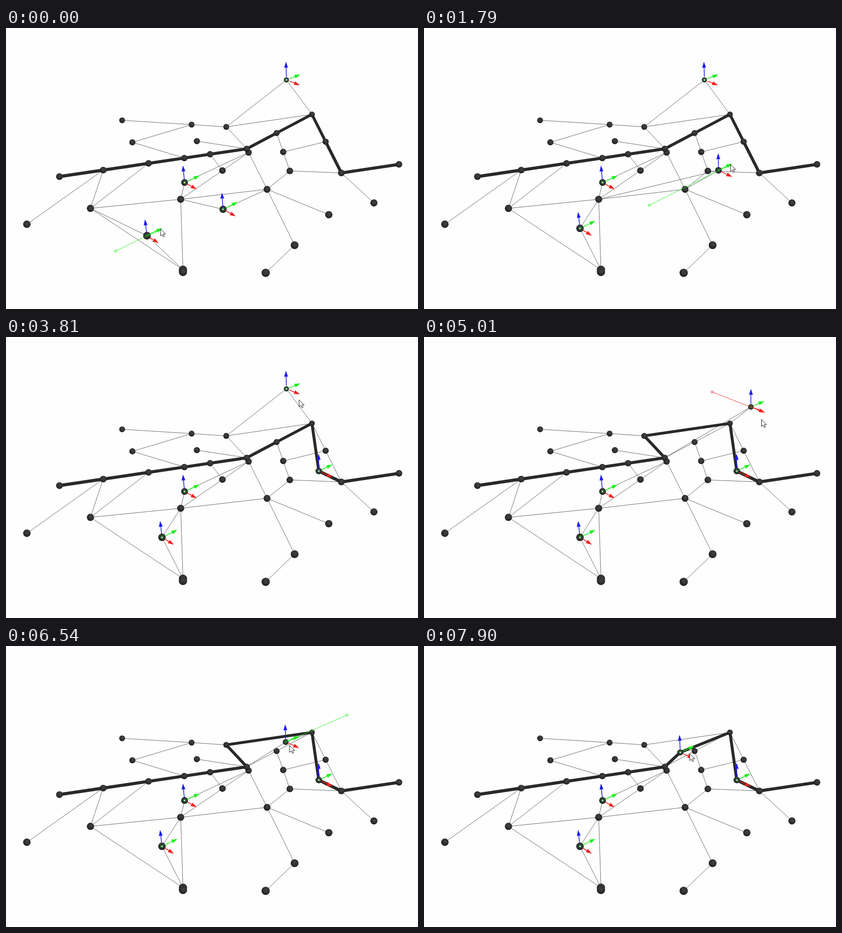
These frames come from a looping animation (904 by 619 pixels, 8 s). An HTML page:

```html
<!DOCTYPE html>
<html lang="en">
<head>
<meta charset="utf-8">
<title>Shortest path network</title>
<style>
  html, body { margin: 0; width: 100%; height: 100%; overflow: hidden; background: #fefefe; }
  svg { display: block; width: 904px; height: 619px; }
</style>
</head>
<body>
<svg viewBox="0 0 904 619" xmlns="http://www.w3.org/2000/svg">
  <defs>
    <radialGradient id="ball" cx=".55" cy=".4" r=".62">
      <stop offset="0" stop-color="#424242"/>
      <stop offset=".6" stop-color="#303030"/>
      <stop offset="1" stop-color="#181818"/>
    </radialGradient>
  </defs>
  <g id="scene" transform="translate(.3 .3)"></g>
  <path id="cursor" d="M0 0V15.5L3.6 12.2 6.2 17.6 8.7 16.4 6.2 11.2H11Z" fill="#fff" stroke="#111"/>
</svg>
<script>
const LOOP = 8000, STEP = 135;
const COLORS = { blue: '#1c1cf0', red: '#f51c1c', green: '#1cf01c' };
const GRIP = { red: 0.7, green: 0.88 };
const scene = document.getElementById('scene');
const cursor = document.getElementById('cursor');

const clamp = k => Math.max(0, Math.min(1, k));
const ease = k => 1 - (1 - clamp(k)) ** 2.4;
const add = ([x, y], [dx, dy], k = 1) => [x + dx * k, y + dy * k];
const mix = ([x1, y1], [x2, y2], k) => [x1 + (x2 - x1) * k, y1 + (y2 - y1) * k];

// Free joints
const joints = {
  H: [671, 190], J: [735.5, 319], K: [862, 300], L: [254.5, 203], M: [407, 212.5],
  N: [483, 217.5], O: [277, 251.5], P: [418.5, 249], R: [622.5, 314.5], T: [383, 377],
  U: [572.5, 355], V: [185, 397], W: [45.5, 432], X: [708, 411], Y: [807, 385],
  Z: [633, 478], a: [569.5, 539], b: [388, 532], c: [388, 537], f: [532, 274]
};
// Joints that lie on a straight run
[117, 213, 312.5, 391, 447.5, 528].forEach((x, i) => {
  joints['ABCDEF'[i]] = [x, 327 - (x - 117) * 0.149];
});
joints.G = mix(joints.F, joints.H, 0.458);
joints.I = mix(joints.H, joints.J, 0.466);
joints.Q = mix(joints.G, joints.R, 0.5);
joints.S = mix(joints.T, joints.f, 0.615);

const movable = { 1: [391.5, 340], 2: [220, 501], 3: [476, 399], 4: [615, 114] };
const drags = [
  { node: 2, axis: 'green', start: -309, end: 426, to: [342, 441], slip: [0, 0] },
  { node: 3, axis: 'green', start: 1270, end: 2325, to: [684, 294], slip: [0, 0] },
  { node: 3, axis: 'red', start: 2745, end: 3290, to: [686, 295], slip: [13, 1] },
  { node: 4, axis: 'red', start: 4500, end: 5430, to: [731, 159], slip: [2, 22] },
  { node: 4, axis: 'green', start: 5670, end: 7870, to: [562, 234], slip: [-26, 28] }
];
const REST = [583, 237];

const thinChains = 'WBVC VTbV LMNF MOD PFGHN ES TSf TUf URQG RJ QIH IJY UX UZa T1f 2b 4H'.split(' ');

function chainsAt(t) {
  return [...thinChains, t < 280 ? '2V' : '2T', t < 2325 ? 'T3U' : 'H3J', t < 4750 ? '4N' : '4F'];
}

function routeAt(t) {
  const upper = t < 4750 ? 'G' : t < 6650 ? 'N' : '4';
  return 'ABCDEF' + upper + 'H' + (t < 2325 ? 'I' : '3') + 'JK';
}

const pull = (drag, t) => ease((t - drag.start) / (drag.end - drag.start));

function place(node, t) {
  let p = movable[node];
  for (const d of drags) {
    if (d.node == node && t > d.start) p = mix(p, d.to, pull(d, t));
  }
  return p;
}

// Axis vectors change slightly with perspective
const axes = ([x, y]) => ({
  blue: [(x - 716) / 90, -40 + (y - 114) / 85],
  red: [26 + (x - 342) / 75, 12 + (y - 114) / 80],
  green: [29.5 + (716 - x) / 90, -12 - (y - 114) / 75]
});

const onAxis = (p, axis, k) => add(p, axes(p)[axis], k);
const grabPoint = (d, t) => onAxis(place(d.node, t), d.axis, GRIP[d.axis]);

function pointerAt(t) {
  const i = drags.filter(d => d.start <= t).length - 1;
  const now = drags[i], next = drags[i + 1];
  const here = add(grabPoint(now, t), now.slip, pull(now, t));
  if (t < now.end) return here;
  if (!next) return REST;
  const glide = (next.start - now.end) * 0.7;
  return mix(here, grabPoint(next, next.start), ease((t - now.end) / glide));
}

const radius = y => 6.3 + (y - 190) / 125;
const line = ([x1, y1], [x2, y2], color, width) =>
  `<line x1="${x1}" y1="${y1}" x2="${x2}" y2="${y2}" stroke="${color}" stroke-width="${width}"/>`;
const circle = ([x, y], r, paint) => `<circle cx="${x}" cy="${y}" r="${r}" ${paint}/>`;
const square = ([x, y], size, paint) =>
  `<rect x="${x - size / 2}" y="${y - size / 2}" width="${size}" height="${size}" ${paint}/>`;
const ball = p => circle(p, radius(p[1]), 'fill="url(#ball)"');
const thin = (p, q) => line(p, q, '#3c3c3c', 0.8);
const thick = (p, q) => line(p, q, '#292929', radius((p[1] + q[1]) / 2) * 0.95);

function chain(names, nodes, stroke) {
  return [...names].slice(1).map((name, i) => stroke(nodes[names[i]], nodes[name])).join('');
}

function arrow(p, v, color, width) {
  const len = Math.hypot(...v), u = [v[0] / len, v[1] / len], side = [-u[1], u[0]];
  const tip = add(p, v), base = add(tip, u, -13);
  return line(add(p, u, 7), base, color, width) +
    `<polygon points="${tip} ${add(base, side, 4.2)} ${add(base, side, -4.2)}" fill="${color}"/>`;
}

function guide(p, drag) {
  const color = COLORS[drag.axis];
  const anchor = onAxis(place(drag.node, drag.start), drag.axis, 0.57);
  const mid = onAxis(p, drag.axis, 0.57);
  return line(anchor, mid, color, 0.9) + line(p, mid, color, 1.2) +
    line(add(mid, [-4, 0]), add(mid, [4, 0]), color, 1) +
    line(add(mid, [0, -4]), add(mid, [0, 4]), color, 1) +
    square(anchor, 4, `fill="#fff" stroke="${color}"`) +
    circle(p, 2.6, 'fill="none" stroke="#167d2b" stroke-width="1.2"');
}

function gizmo(p, drag) {
  const vectors = axes(p);
  const arrows = Object.keys(vectors).map(axis =>
    arrow(p, vectors[axis], COLORS[axis], drag && drag.axis === axis ? 2.2 : 1.6)).join('');
  if (drag) return arrows + guide(p, drag);
  return arrows + circle(p, 3.1, 'fill="#111" stroke="#167d2b" stroke-width="1.3"') +
    square(p, 3, 'fill="#f4fff4"');
}

function draw(t) {
  const nodes = { ...joints };
  for (const id in movable) nodes[id] = place(id, t);
  const active = drags.find(d => t >= d.start && t < d.end);

  scene.innerHTML = chainsAt(t).map(c => chain(c, nodes, thin)).join('') +
    chain(routeAt(t), nodes, thick) +
    Object.values(nodes).map(ball).join('') +
    Object.keys(movable).map(id =>
      gizmo(nodes[id], active && active.node == id ? active : null)).join('');
  cursor.setAttribute('transform', `translate(${pointerAt(t)})`);
}

// The view refreshes in even steps, each showing a moment inside its step
const snap = t => Math.max(0, Math.floor((t - 15) / STEP) * STEP + 50);

let shown = -1;
const begin = performance.now();
function tick() {
  const t = snap((performance.now() - begin) % LOOP);
  if (t !== shown) draw(shown = t);
  requestAnimationFrame(tick);
}
tick();
</script>
</body>
</html>
```
